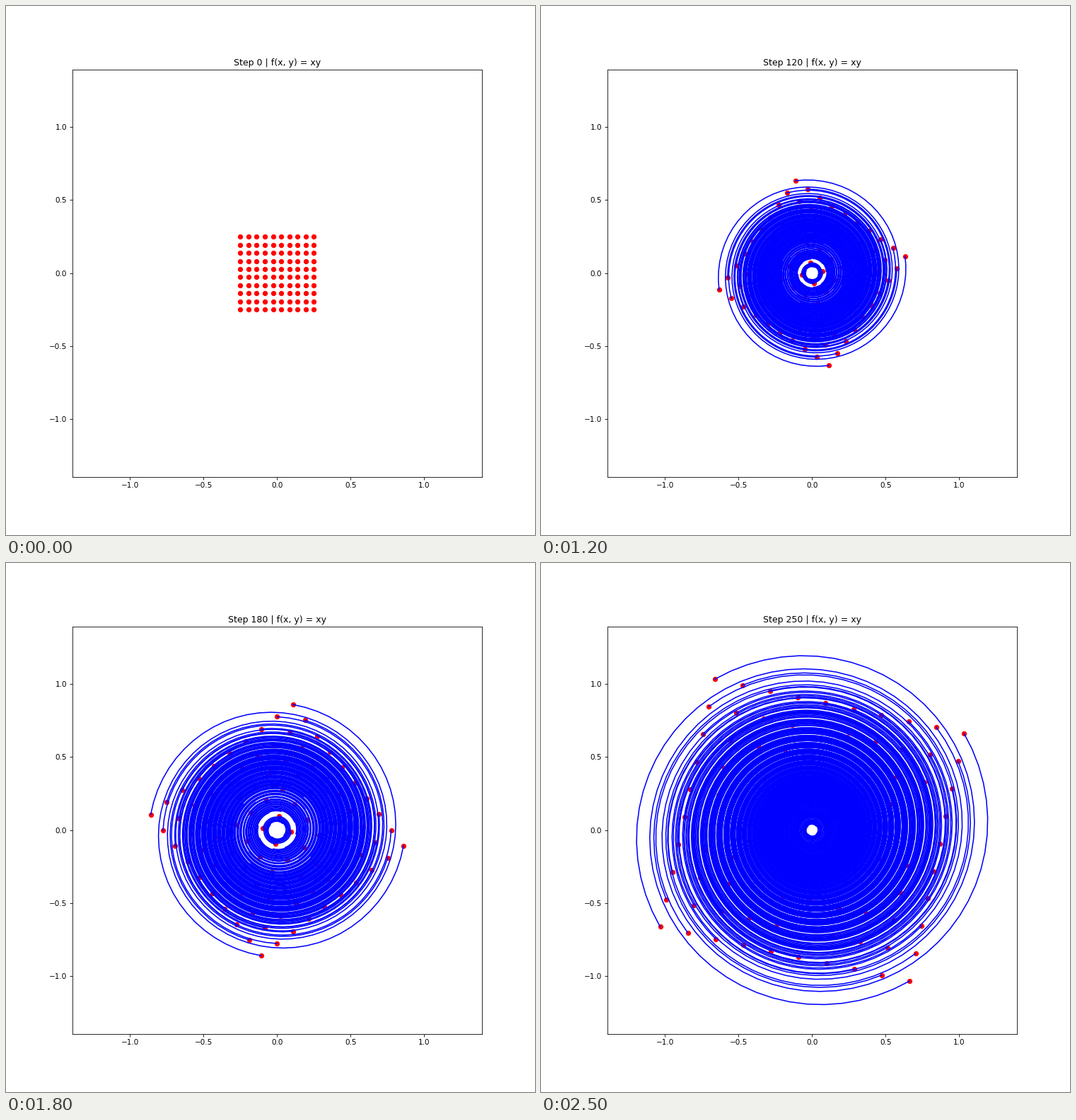
A matplotlib script for the animation above (2600 ms loop, 748 by 748 pixels).

```python
import numpy as np
import matplotlib.pyplot as plt
from matplotlib.animation import FuncAnimation

RATE = 0.1       # step size of the descent-ascent update
STEPS = 250
STRIDE = 10      # steps between drawn frames
TRAIL = 100      # steps of history kept behind each point

# x -= RATE * y, y += RATE * x is multiplication by 1 + RATE*i
side = np.linspace(-0.25, 0.25, 10)
start = (side[:, None] + 1j * side[None, :]).ravel()
paths = start * (1 + RATE * 1j) ** np.arange(STEPS + 1)[:, None]
limit = np.abs(paths.real).max() + 0.2

fig, ax = plt.subplots(figsize=(10, 10), dpi=74.8)
ax.set_xlim(-limit, limit)
ax.set_ylim(-limit, limit)
ticks = np.arange(-1, 1.1, 0.5)
ax.set_xticks(ticks)
ax.set_yticks(ticks)
title = ax.set_title("")

dots, = ax.plot([], [], "o", color="red", markersize=6, zorder=1)
trails = [ax.plot([], [], color="blue", lw=1.5)[0] for _ in start]


def draw(frame):
    step = frame * STRIDE
    # the closing frame reveals the complete history
    first = 0 if step == STEPS else max(0, step - TRAIL)
    history = paths[first:step + 1]
    for trail, z in zip(trails, history.T):
        trail.set_data(z.real, z.imag)
    dots.set_data(paths[step].real, paths[step].imag)
    title.set_text(f"Step {step} | f(x, y) = xy")
    return [dots, title, *trails]


anim = FuncAnimation(fig, draw, frames=STEPS // STRIDE + 1, interval=100,
                     repeat=True, repeat_delay=0, blit=False)
plt.show()
```
